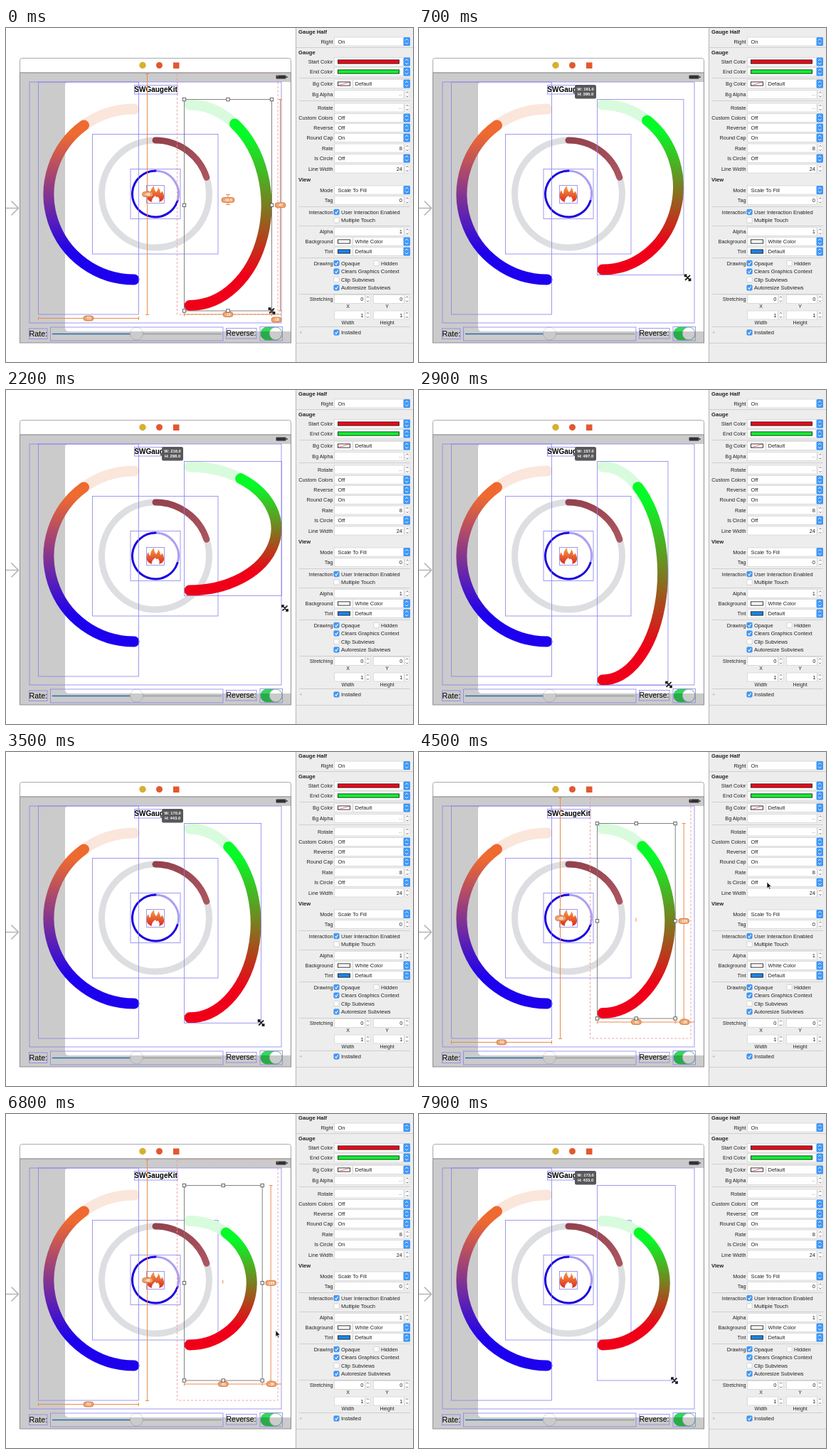
An HTML page that plays this animation: 572x470 px, repeating every 8000 ms.

```html
<!DOCTYPE html>
<html lang="en">
<head>
<meta charset="utf-8">
<title>Gauge inspector</title>
<style>
html, body { margin: 0; width: 100%; height: 100%; overflow: hidden; background: #fff; }
svg { display: block; width: 572px; height: 470px; font-family: "Liberation Sans", Arial, sans-serif; }
.box { fill: none; stroke: #8880ec; stroke-width: .8; }
.panel { font-size: 7.5px; fill: #222; }
.label { font-size: 7.3px; text-anchor: end; }
.head { font-size: 7.6px; font-weight: bold; }
.sep { stroke: #cfcfcf; stroke-width: 1; }
.wire { fill: none; stroke: #e88b4c; stroke-width: 1; }
.dash { fill: none; stroke: #e89a98; stroke-width: .9; stroke-dasharray: 3 2.5; }
.pill { fill: #f0a26c; stroke: #c8743c; stroke-width: .8; }
.pillText { font-size: 5px; fill: #fff; text-anchor: middle; font-weight: bold; }
.arc { fill: none; stroke-width: 15; stroke-linecap: round; }
</style>
</head>
<body>
<svg viewBox="0 0 572 470">
  <defs>
    <linearGradient id="leftFill" gradientUnits="userSpaceOnUse" x1="0" y1="114" x2="0" y2="354">
      <stop offset=".15" stop-color="#ee6a30"/><stop offset=".85" stop-color="#1c00ee"/>
    </linearGradient>
    <linearGradient id="rightFill" gradientUnits="userSpaceOnUse" x1="0" x2="0">
      <stop offset=".15" stop-color="#05fb28"/><stop offset=".85" stop-color="#f00018"/>
    </linearGradient>
    <linearGradient id="flame" x1="0" y1="0" x2="0" y2="1">
      <stop offset="0" stop-color="#f5a04a"/><stop offset="1" stop-color="#dd2a1c"/>
    </linearGradient>
    <linearGradient id="wine" x1="0" y1="0" x2="1" y2="1">
      <stop offset="0" stop-color="#93424d"/><stop offset="1" stop-color="#ab5560"/>
    </linearGradient>
  </defs>
  <g id="scene"></g>
  <g id="live">
    <path id="rightBg" class="arc" stroke="#d9fbdd"/>
    <path id="rightArc" class="arc" stroke="url(#rightFill)"/>
  </g>
  <g id="overlay"></g>
  <g id="panel" class="panel"></g>
  <g id="menu" class="panel"></g>
  <path id="resize" d="M-3.5-3.5L3.5 3.5M3.5-3.5L-3.5 3.5M-4-1V-4H-1M4 1V4H1" fill="none"/>
  <path id="pointer" d="M0 0V9L2.1 7.1L3.6 10.3L5 9.6L3.5 6.6H6.3Z" fill="#111" stroke="#fff" stroke-width=".6"/>
</svg>
<script>
const $ = id => document.getElementById(id);
const LOOP = 8000, LEFT = 250.5, TOP = 100.5, LINE = 15;

const rect = (x, y, w, h, attrs = '') => `<rect x="${x}" y="${y}" width="${w}" height="${h}" ${attrs}/>`;
const frame = (x0, y0, x1, y1, cls = 'box') => rect(x0, y0, x1 - x0, y1 - y0, `class="${cls}"`);
const path = (d, attrs = '') => `<path d="${d}" ${attrs}/>`;
const circle = (x, y, r, attrs) => `<circle cx="${x}" cy="${y}" r="${r}" ${attrs}/>`;
const text = (x, y, s, attrs = '') => `<text x="${x}" y="${y}" ${attrs}>${s}</text>`;

// Angles are degrees clockwise from the top.
function arc(cx, cy, rx, ry, from, to) {
  const at = a => {
    const r = a * Math.PI / 180;
    return `${(cx + rx * Math.sin(r)).toFixed(2)} ${(cy - ry * Math.cos(r)).toFixed(2)}`;
  };
  const large = Math.abs(to - from) > 180 ? 1 : 0;
  return `M${at(from)}A${rx} ${ry} 0 ${large} ${to > from ? 1 : 0} ${at(to)}`;
}

function drawScene() {
  const shade = 'fill="#000" fill-opacity=".205" fill-rule="evenodd"';
  $('scene').innerHTML =
    rect(0, 0, 572, 470, 'fill="#fff"') +
    path('M0 253.5H17M7.5 243.5L17.5 253.5L7.5 263.5', 'fill="none" stroke="#b4b4b4" stroke-width="1.6"') +
    path('M19.5 63V45.5Q19.5 42.5 22.5 42.5H397.5Q400.5 42.5 400.5 45.5V63Z', 'fill="#fff" stroke="#aaa"') +
    circle(192, 52.5, 4.7, 'fill="#d6b02e"') +
    circle(215.5, 52.5, 4.5, 'fill="#e2582f"') +
    rect(235, 48.5, 8.5, 8.5, 'fill="#e2582f"') +
    rect(20, 63, 380.5, 380, 'fill="#fff"') +
    path('M65 430.5H183', 'stroke="#2f86d8" stroke-width="1.6"') +
    path('M183 430.5H303', 'stroke="#c4c4c4" stroke-width="1.6"') +
    circle(183.5, 430, 9, 'fill="#fff" stroke="#ccc" stroke-width=".7"') +
    rect(357.5, 420.5, 31, 19, 'rx="9.5" fill="#35d65c"') +
    circle(379, 430, 8.8, 'fill="#fff" stroke="#bbb" stroke-width=".6"') +
    path('M20 63H400.5V443H20ZM88 76Q83 76 83 81V421Q83 427 89 427H400.5V76Z', shade) +
    frame(19.5, 63, 400.5, 443, 'edge').replace('class="edge"', 'fill="none" stroke="#8d8d96"') +
    rect(379.5, 66.5, 14, 5, 'rx="1" fill="#333"') + rect(394, 68, 1.5, 2, 'fill="#333"') +
    text(180.3, 90, 'SWGaugeKit', 'font-size="10" font-weight="bold"') +
    text(32.5, 434, 'Rate:', 'font-size="10.8"') +
    text(309.5, 433, 'Reverse:', 'font-size="10.5"') +
    path(arc(180, 234, 120, 120, 0, -36), 'class="arc" stroke="#fbe6dc"') +
    path(arc(180, 234, 120, 120, -36, -180), 'class="arc" stroke="url(#leftFill)"') +
    circle(210, 233.5, 75.5, 'fill="none" stroke="#dddee1" stroke-width="9"') +
    path(arc(210, 233.5, 75.5, 75.5, 0, 72), 'fill="none" stroke="url(#wine)" stroke-width="9" stroke-linecap="round"') +
    path(arc(210, 233.5, 32.5, 32.5, 0, 108), 'fill="none" stroke="#ab9ff4" stroke-width="3"') +
    path(arc(210, 233.5, 32.5, 32.5, 0, -252), 'fill="none" stroke="#1a00e0" stroke-width="3" stroke-linecap="round"') +
    path('M205 245C196 242 196 234 200 228Q201 233 203 233Q203 226 208 222Q208 228 211 231Q214 228 214 224Q217 228 217 232Q219 232 219 229C224 236 223 243 215 245Q217 240 213 237Q212 240 210 236Q204 240 205 245Z',
      'fill="url(#flame)"') +
    [[33, 76, 387, 415], [45.5, 76, 186.5, 403], [121.5, 149.5, 298, 318], [175, 198.5, 245, 268.5],
     [197.5, 221.5, 222.5, 246.5], [180.5, 80.5, 241, 93], [32.5, 423, 58, 437.5],
     [62.5, 421, 305, 440], [309.5, 422.5, 352, 437], [357, 420.5, 388.5, 440]].map(b => frame(...b)).join('');
}

function drawPanel() {
  const out = [];
  const add = (...parts) => out.push(...parts);
  const box = (x, y, w) => rect(x, y - 6, w, 12, 'fill="#fff" stroke="#d0d0d0" stroke-width=".7"');
  const label = (y, s) => text(459.5, y + 2.6, s, 'class="label"');
  const stepper = (x, y) => rect(x - 3.5, y - 6, 7, 12, 'rx="3" fill="#fff" stroke="#ccc" stroke-width=".6"') +
    path(`M${x - 1.6} ${y - 2}l1.6-1.8l1.6 1.8M${x - 1.6} ${y + 2}l1.6 1.8l1.6-1.8`, 'fill="none" stroke="#555" stroke-width=".8"');
  const select = (y, name, value, id = '', x = 466.5) => add(label(y, name), box(461.5, y, 106),
    rect(558.5, y - 6, 9.5, 12, 'rx="1.5" fill="#3f97f6"'),
    path(`M561 ${y - 1.4}l2.2-2.2l2.2 2.2M561 ${y + 1.4}l2.2 2.2l2.2-2.2`, 'fill="none" stroke="#fff" stroke-width=".9"'),
    text(x, y + 2.6, value, id && `id="${id}"`));
  const field = (y, name, value) => add(label(y, name), box(461.5, y, 97.5), stepper(564, y),
    text(557, y + 2.6, value, `text-anchor="end" ${value === '--' ? 'fill="#aaa"' : ''}`));
  const swatch = (y, w, color) => add(rect(466.5, y - 2.6, w, 5.2, `fill="${color}" stroke="#222" stroke-width=".9"`));
  const check = (x, y, s, on) => add(
    rect(x - 3.7, y - 3.7, 7.4, 7.4, `rx="1.4" fill="${on ? '#3f97f6' : '#fff'}" stroke="${on ? '#3587e2' : '#bbb'}" stroke-width=".6"`),
    on ? path(`M${x - 2} ${y}l1.5 2l2.6-4`, 'fill="none" stroke="#fff" stroke-width="1.1"') : '',
    text(x + 6.5, y + 2.7, s));
  const pair = (y, a, b, nameA, nameB) => [[461.5, a, nameA], [516.5, b, nameB]].forEach(([x, v, name]) => add(
    box(x, y, 43), stepper(x + 47, y), text(x + 41, y + 2.6, v, 'text-anchor="end"'),
    text(x + 19, y + 12.5, name, 'text-anchor="middle" font-size="7"')));

  add(rect(407, 0, 165, 470, 'fill="#ededed"'), path('M407.5 0V470', 'stroke="#b5b5b5"'));
  [[7.5, 'Gauge Half'], [36.5, 'Gauge'], [216, 'View']].forEach(([y, s]) => add(text(411, y, s, 'class="head"')));
  [27, 206.5, 443].forEach(y => add(path(`M408 ${y}.5H572`, 'class="sep"')));
  [70, 102, 251, 278, 323, 374, 420].forEach(y => add(path(`M412 ${y}.5H568`, 'class="sep"')));

  select(19, 'Right', 'On');
  select(47.5, 'Start Color', ''); swatch(47.5, 86, '#ee0818');
  select(61.5, 'End Color', ''); swatch(61.5, 86, '#0cf52c');
  select(78.5, 'Bg Color', 'Default', '', 490.5); swatch(78.5, 17, '#fff');
  add(path('M467 81L483 76', 'stroke="#e05060" stroke-width=".8"'), path('M487.5 73V84', 'class="sep"'));
  field(93.5, 'Bg Alpha', '--');
  field(112, 'Rotate', '--');
  select(126.5, 'Custom Colors', 'Off');
  select(140.5, 'Reverse', 'Off');
  select(154.5, 'Round Cap', 'On');
  field(169, 'Rate', '8');
  select(183.5, 'Is Circle', 'Off', 'isCircle');
  field(198, 'Line Width', '24');
  select(228, 'Mode', 'Scale To Fill');
  field(242.5, 'Tag', '0');
  add(label(259, 'Interaction'));
  check(464.5, 259, 'User Interaction Enabled', true);
  check(464.5, 270.5, 'Multiple Touch', false);
  field(286.5, 'Alpha', '1');
  select(300.5, 'Background', 'White Color', '', 490.5); swatch(300.5, 17, '#fff');
  select(314.5, 'Tint', 'Default', '', 490.5); swatch(314.5, 17, '#1a86ea');
  add(path('M487.5 295V306M487.5 309V320', 'class="sep"'), label(331, 'Drawing'));
  check(464.5, 331, 'Opaque', true);
  check(520.5, 331, 'Hidden', false);
  check(464.5, 342.5, 'Clears Graphics Context', true);
  check(464.5, 354, 'Clip Subviews', false);
  check(464.5, 365.5, 'Autoresize Subviews', true);
  add(label(381.5, 'Stretching'));
  pair(381.5, 0, 0, 'X', 'Y');
  pair(404, 1, 1, 'Width', 'Height');
  add(text(412, 431, '+', 'fill="#aaa"'));
  check(464.5, 428.5, 'Installed', true);
  $('panel').innerHTML = out.join('');

  $('menu').innerHTML =
    rect(454.5, 152.5, 110, 40, 'fill="#000" fill-opacity=".13" rx="2"') +
    rect(454, 151.5, 110, 39.5, 'fill="#ececec" fill-opacity=".95" stroke="#c8c8c8" stroke-width=".7" rx="2"') +
    rect(454.5, 171, 109, 10, 'id="hover" fill="#3f8df5"') +
    text(466, 161, 'Default') + text(466, 179, 'On', 'id="menuOn"') + text(466, 189.5, 'Off') +
    path('M457 186.5l1.5 2l2.5-4.5', 'fill="none" stroke="#333" stroke-width=".8"');
}

const pill = (x, y, s, w = 14) => rect(x - w / 2, y - 3.5, w, 7, 'rx="3.5" class="pill"') +
  text(x, y + 1.9, s, 'class="pillText"');

function constraints(x1, y1, first) {
  const mx = (LEFT + x1) / 2, my = (TOP + y1) / 2, side = x1 + 12, base = y1 + 5;
  const wires = `M198.5 64V403M196 64.5H201M196 403.5H201M45.5 408.5H186.5M45.5 406V411M186.5 406V411` +
    `M${side} ${TOP}V${y1}M${side - 2.5} ${TOP}h5M${side - 2.5} ${y1}h5` +
    `M${LEFT} ${base}H${x1}M${LEFT} ${base - 2.5}v5M${x1} ${base - 2.5}v5M${x1} ${base}H387`;
  const middle = first
    ? path(`M${mx} 234V249M${mx - 3} 234.5h6M${mx - 3} 248.5h6`, 'class="wire"') + pill(mx, 242, '-19.5', 18)
    : path(`M${mx - .5} 233.5v5`, 'class="wire"');
  const handles = [LEFT, mx, x1].flatMap(x => [TOP, my, y1].map(y => x === mx && y === my ? '' :
    rect(x - 2.2, y - 2.2, 4.4, 4.4, 'fill="#fff" stroke="#555" stroke-width=".9"')));
  return frame(240.5, 64, 382, 403, 'dash') + path(wires, 'class="wire"') +
    rect(LEFT, TOP, x1 - LEFT, y1 - TOP, 'fill="none" stroke="#777" stroke-width=".9"') + middle +
    pill(199, 234, '-49', 15) + pill(116, 408.5, '-51') + pill(mx, base, first ? '-19' : '-91') +
    pill(side, my, first ? '-47' : '-105', 15) +
    (first ? pill(380, 410.5, '-18') : pill(x1 + 13, base, '-36')) + handles.join('');
}

function hud(x1, y1) {
  const size = v => (v * 1.577).toFixed(0) + '.0';
  const attrs = 'font-size="5.8" font-weight="bold" fill="#fff" text-anchor="middle"';
  return frame(LEFT, TOP, x1, y1) + rect(219, 80, 30, 19.5, 'rx="2.5" fill="#58585a"') +
    text(234, 88, 'W: ' + size(x1 - LEFT), attrs) + text(234, 95.3, 'H: ' + size(y1 - TOP), attrs);
}

// Tracks hold [time, x, y].
const corner = [[0, 373.5, 398], [300, 373.5, 398], [1300, 369, 254.5], [2200, 387.5, 289.5],
  [2900, 350, 415.5], [3700, 360.2, 375], [LOOP, 360.2, 375]];
const cursor = [[0, 373.5, 398], [300, 373.5, 398], [1300, 385, 265.5], [2200, 392, 307],
  [2900, 351, 414.5], [3700, 360, 375], [3900, 360, 375], [4400, 489, 183], [4800, 489, 183],
  [5200, 487, 174], [5600, 487, 174], [5900, 399, 234], [6400, 399, 234], [7200, 359, 375], [LOOP, 359, 375]];

function follow(track, t) {
  const i = track.findIndex(k => k[0] > t);
  const [a, b] = [track[i - 1], track[i]];
  const u = (t - a[0]) / (b[0] - a[0]), e = u * u * (3 - 2 * u);
  return [1, 2].map(n => a[n] + (b[n] - a[n]) * e);
}

const show = (id, on) => $(id).setAttribute('visibility', on ? 'visible' : 'hidden');

function render(t) {
  const [x1, y1] = follow(corner, t), [px, py] = follow(cursor, t);
  const round = t >= 6200;
  const w = x1 - LEFT, cx = LEFT + LINE / 2, cy = (TOP + y1) / 2;
  const rx = round ? w - 1.5 * LINE : w - LINE;
  const ry = round ? rx : (y1 - TOP - LINE) / 2;
  $('rightBg').setAttribute('d', arc(cx, cy, rx, ry, 0, 36));
  $('rightArc').setAttribute('d', arc(cx, cy, rx, ry, 36, 180));
  $('rightFill').setAttribute('y1', cy - ry);
  $('rightFill').setAttribute('y2', cy + ry);

  const dragging = t >= 300 && t < 3900 || t >= 7600;
  $('overlay').innerHTML = dragging ? hud(x1, y1) : constraints(x1, y1, t < 300);

  const hovering = t >= 5100 && t < 5600;
  show('menu', t >= 4800 && t < 6000);
  $('hover').setAttribute('opacity', hovering ? 1 : 0);
  $('menuOn').setAttribute('fill', hovering ? '#fff' : '#222');
  $('isCircle').textContent = t >= 6000 ? 'On' : 'Off';

  const resizing = t < 4000 || t >= 7200;
  show('resize', resizing);
  show('pointer', !resizing);
  $(resizing ? 'resize' : 'pointer').setAttribute('transform', `translate(${px} ${py})`);
}

function tick() {
  render(Math.floor(performance.now() % LOOP / 100) * 100);
  requestAnimationFrame(tick);
}

drawScene();
drawPanel();
$('resize').setAttribute('stroke', '#111');
$('resize').setAttribute('stroke-width', '1.7');
tick();
</script>
</body>
</html>
```
